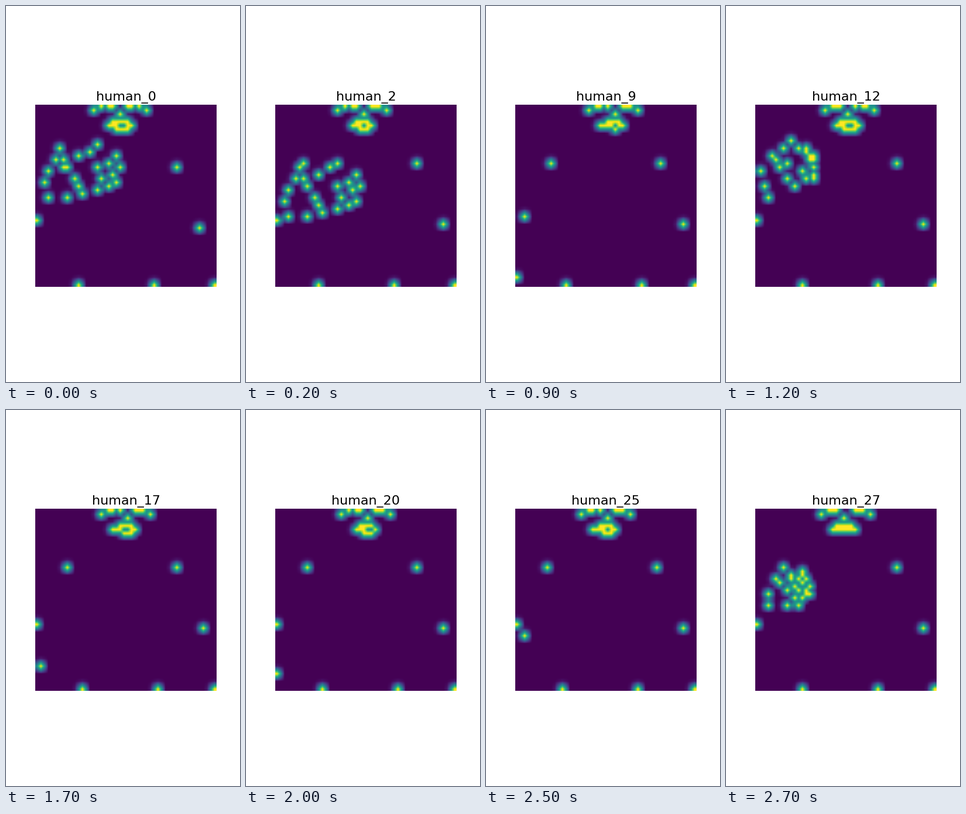
These frames come from a looping animation (400x640 px, 2.8 s). A matplotlib script:

```python
import numpy as np
import matplotlib.pyplot as plt
from matplotlib.animation import FuncAnimation

FRAMES, STEP_MS = 28, 100
GRID = 48

# Pose over time: head column, mouth opening, row of the waving wrist
KEYS = [0, 5, 9, 12, 17, 22, 27]
HEAD = [22, 24, 25.6, 24.4, 23.6, 23.9, 23.47]
OPENING = [1, 0.2, 0.2, 1, 1, 1, 0]
WRIST = [24, 37, 45, 24, 41, 45, 25]
HAND_LIMIT = 31.5  # the hand is tracked only above this row

# Rest column and row of each joint, and how far it follows the head
BODY = {
    "left shoulder": (7.75, 15, 0.5, -0.3),
    "right shoulder": (37.35, 15.2, 0.3, -0.2),
    "left elbow": (0.1, 29.85, 0.9, -0.3),
    "right elbow": (43.8, 31.2, 0.2, -0.2),
    "right wrist": (47, 47, 0, 0),
    "left hip": (12, 47, 0.6, 0),
    "right hip": (32, 47, 0.5, 0),
}

# Hand shapes as straight strokes: start, end, number of joints
HANDS = {
    0: [
        ((2, 20), (6, 11), 4),
        ((7, 14), (12.4, 23.4), 5),
        ((16, 22), (21.2, 20), 3),
        ((17, 19), (22, 16), 3),
        ((16.2, 16.2), (21, 13), 3),
        ((11, 13), (16, 10), 3),
        ((8, 24), (8, 24), 1),
    ],
    12: [
        ((4, 13), (6, 16), 3),
        ((7, 11), (9, 9), 2),
        ((11, 11), (13, 11), 2),
        ((13, 12), (14, 14), 3),
        ((15, 13), (15, 19), 5),
        ((12, 17), (13, 19), 2),
        ((8, 19), (10, 21), 2),
        ((1, 17), (2, 21), 2),
    ],
    27: [
        ((5, 18), (6, 19), 2),
        ((9, 17), (9, 18), 2),
        ((11, 18), (12, 16), 3),
        ((10, 23), (13, 17.6), 4),
        ((12, 23), (14, 20), 3),
        ((13, 21), (14, 22), 2),
        ((8, 21), (10, 20), 2),
        ((8, 25), (11, 25), 2),
        ((3, 22), (3, 22), 1),
    ],
}


def run(first, last, row):
    """All cells of one row between two columns."""
    return [(x, row) for x in range(round(first), round(last) + 1)]


def body(head):
    lean = head - 24
    return [(x + kx * lean, y + ky * lean) for x, y, kx, ky in BODY.values()]


def face(head):
    sides = (-1, 1)
    eyes = [(head + s * d, 0) for s in sides for d in (2.05, 3.2, 4.55)]
    ears = [(head + s * 6.55, 1) for s in sides]
    return eyes + ears + [(head, 2)]


def mouth(head, opening):
    mid = head - 0.3
    gap = mid + 0.6
    upper = run(mid - 1.7, mid + 1.9, 4)
    middle = [(x, y) for x, y in run(mid - 2.9, mid + 2.9, 5)
              if opening == 0 or abs(x - gap) > opening]
    lower = run(gap - 1.4 * opening, gap + 1.4 * opening, 6)
    return upper + middle + (lower if opening > 0.1 else [])


def left_hand(frame, wrist_y):
    wrist_x = 3 - ((wrist_y - 24) / 12) ** 2
    points = [(wrist_x, wrist_y)]
    if wrist_y < HAND_LIMIT:
        key = min(HANDS, key=lambda k: abs(k - frame))
        drop = round(wrist_y - WRIST[KEYS.index(key)])
        for (x0, y0), (x1, y1), count in HANDS[key]:
            points += zip(np.linspace(x0, x1, count),
                          np.linspace(y0, y1, count) + drop)
    return points


def landmarks(frame):
    head, opening, wrist_y = (np.interp(frame, KEYS, track)
                              for track in (HEAD, OPENING, WRIST))
    points = (body(head) + face(head) + mouth(head, opening)
              + left_hand(frame, wrist_y))
    return np.clip(np.rint(points), 0, GRID - 1).astype(int)


def heatmap(frame):
    grid = np.zeros((GRID, GRID))
    # The spot is cut one cell short on the right and below
    for x, y in landmarks(frame):
        for row in range(max(y - 2, 0), min(y + 2, GRID)):
            for col in range(max(x - 2, 0), min(x + 2, GRID)):
                value = 0.5 ** ((col - x) ** 2 + (row - y) ** 2)
                grid[row, col] = max(grid[row, col], value)
    return grid


fig, ax = plt.subplots(figsize=(4, 6.4), dpi=100)
fig.subplots_adjust(left=0.125, right=0.9, bottom=0.11, top=0.88)
ax.axis("off")
image = ax.imshow(heatmap(0), cmap="viridis", vmin=0, vmax=1,
                  interpolation="bilinear")
title = ax.set_title("human_0", fontsize=16, family="DejaVu Sans", pad=5.3)


def update(frame):
    image.set_data(heatmap(frame))
    title.set_text(f"human_{frame}")
    return image, title


anim = FuncAnimation(fig, update, frames=FRAMES, interval=STEP_MS,
                     repeat=True, repeat_delay=0, blit=False)
plt.show()
```
